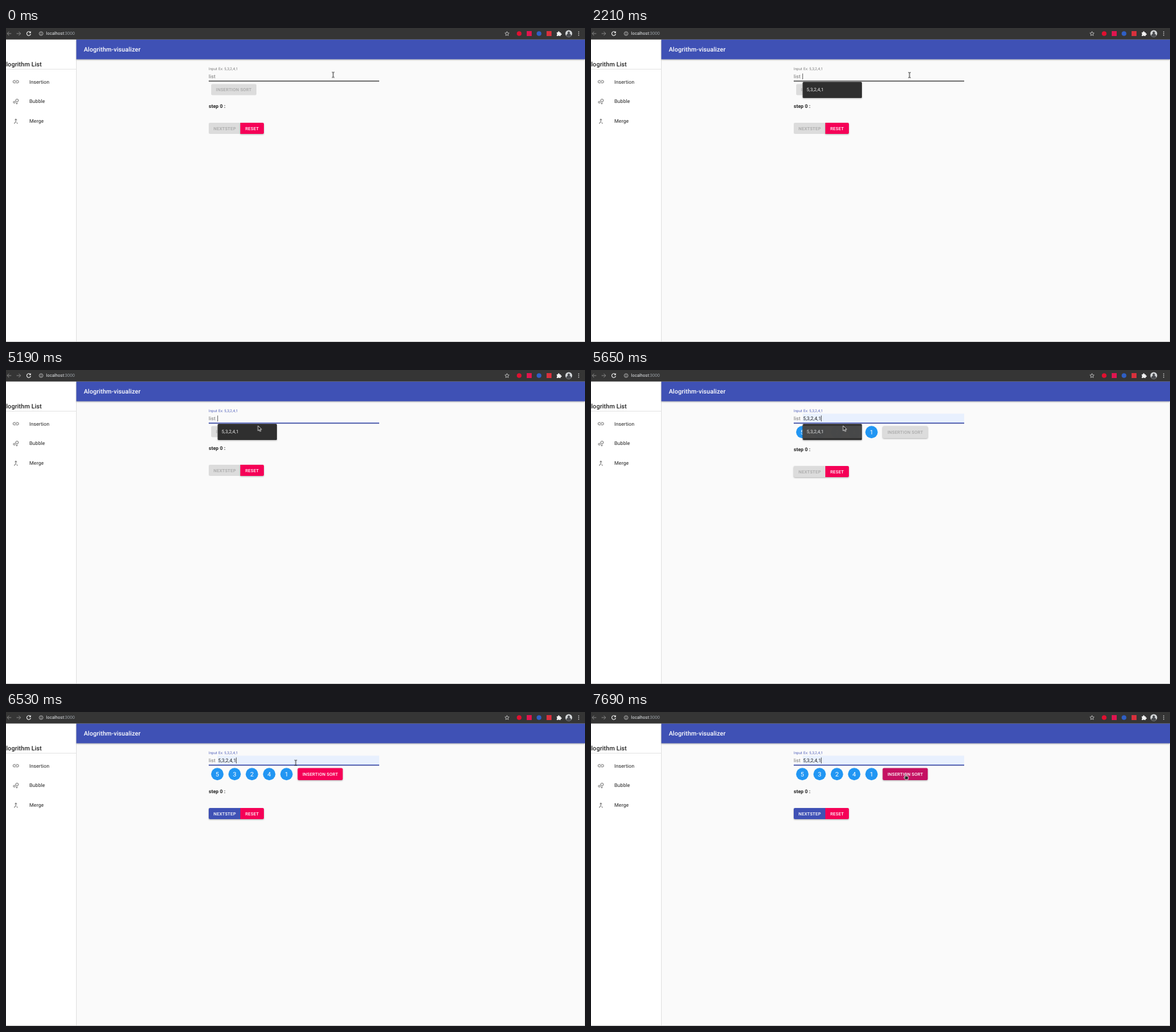
An HTML page that plays this animation: 934 px wide and 507 px high, repeating every 8 s.

```html
<!DOCTYPE html>
<html lang="en">
<head>
<meta charset="utf-8">
<title>Sorting visualizer</title>
<style>
html, body { margin: 0; width: 100%; height: 100%; overflow: hidden; background: #fafafa; }
svg { display: block; width: 934px; height: 507px; }
text { font: 8px Roboto, sans-serif; letter-spacing: .00938em; fill: #212121; text-rendering: geometricPrecision; white-space: pre; }
.title { font-size: 10px; font-weight: 500; letter-spacing: .0075em; }
.btn { font-size: 7px; font-weight: 500; letter-spacing: .02857em; }
.url { font-size: 7px; letter-spacing: 0; fill: #e8eaed; }
.num { font-size: 10px; text-anchor: middle; fill: #fff; letter-spacing: 0; }
.step { font-weight: 700; }
.off { fill: #dcdcdc; }
.offText { fill: #a8a8a8; }
.white { fill: #fff; }
.grey { fill: #757575; }
.lift { filter: drop-shadow(0 1px 1px rgba(0,0,0,.3)); }

/* everything shares one 8 s clock */
.t { animation: 8s linear infinite; }
.hard { animation: 8s step-end infinite; }
.before { animation-name: before; }
.after { animation-name: after; }
.label { animation-name: label; }
.focus { animation-name: focus; transform-origin: 464.5px 85px; }
.blink { animation-name: blink; }
.fill { animation-name: fill; }
.popup { animation-name: popup; transform-origin: 389px 100px; }
.hover { animation-name: hover; }
.next { animation-name: next; }
.sort { animation-name: sort; }
.on { animation-name: on; }
.pointer { animation-name: move; }
.beam { animation-name: beam; }
.arrow { animation-name: arrow; }
.hand { animation-name: hand; }

@keyframes before { 0% { opacity: 1 } 70.625%, 100% { opacity: 0 } }
@keyframes after { 0% { opacity: 0 } 70.625%, 100% { opacity: 1 } }
@keyframes label { 0%, 27.7% { fill: #7d7d7d } 30.2%, 100% { fill: #5766bd } }
@keyframes focus {
  0%, 27.7% { transform: scaleX(0); animation-timing-function: cubic-bezier(0, 0, .2, 1) }
  30.2%, 100% { transform: scaleX(1) }
}
@keyframes blink {
  0% { opacity: 0 } 27.55% { opacity: 1 } 35.25% { opacity: 0 } 42.75% { opacity: 1 }
  50.25% { opacity: 0 } 57.75% { opacity: 1 } 65.25%, 100% { opacity: 0 }
}
@keyframes fill { 0% { opacity: 0 } 65.5%, 100% { opacity: 1 } }
@keyframes hover { 0% { opacity: 0 } 65.5%, 100% { opacity: 1 } }
@keyframes popup {
  0%, 27.54% { opacity: 0; transform: none }
  27.55%, 70.625% { opacity: 1; transform: none }
  73.125%, 100% { opacity: 0; transform: scale(.96, .9) }
}
@keyframes next {
  0%, 70.625% { fill: #dcdcdc; animation-timing-function: cubic-bezier(.4, 0, .2, 1) }
  73.75%, 100% { fill: #3f51b5 }
}
@keyframes sort {
  0%, 70.625% { fill: #dcdcdc; animation-timing-function: cubic-bezier(.4, 0, .2, 1) }
  73.75%, 91.4% { fill: #f50057; animation-timing-function: cubic-bezier(.4, 0, .2, 1) }
  94.5%, 100% { fill: #c51162 }
}
@keyframes on { 0%, 70.625% { fill: #a8a8a8 } 72%, 100% { fill: #fff } }
@keyframes move {
  0%, 5.875% { transform: translate(527.7px, 75.6px) }
  10.25%, 40.25% { transform: translate(513.7px, 76px) }
  46.25%, 48.6% { transform: translate(435px, 93px) }
  49.5%, 57.25% { transform: translate(423.5px, 86px) }
  58.9%, 63.875% { transform: translate(415px, 85.5px) }
  64.875%, 70.625% { transform: translate(406.5px, 90px) }
  72.3%, 79.875% { transform: translate(416.3px, 85.5px) }
  81.6% { transform: translate(467.2px, 82px) }
  89.5%, 90.4% { transform: translate(500px, 88px) }
  96.1%, 100% { transform: translate(508px, 104.5px) }
}
@keyframes beam { 0% { opacity: 1 } 44.5% { opacity: 0 } 71.2% { opacity: 1 } 91.4%, 100% { opacity: 0 } }
@keyframes arrow { 0% { opacity: 0 } 44.5% { opacity: 1 } 71.2%, 100% { opacity: 0 } }
@keyframes hand { 0% { opacity: 0 } 91.4%, 100% { opacity: 1 } }
</style>
</head>
<body>
<svg viewBox="0 0 934 507">
  <!-- page -->
  <rect width="934" height="507" fill="#fafafa"/>
  <rect y="18" width="113" height="489" fill="#fff"/>
  <rect x="113" y="18" width="1" height="489" fill="#e0e0e0"/>
  <rect y="66" width="113" height="1" fill="#e4e4e4"/>
  <rect class="lift" x="113.5" y="18.5" width="820.5" height="32" fill="#3f51b5"/>
  <rect x="933" y="51" width="1" height="456" fill="#e6e6e6"/>
  <rect y="506" width="934" height="1" fill="#c4c4c4"/>
  <text class="title white" x="125.4" y="38">Alogrithm-visualizer</text>
  <text class="title" x="-6.5" y="62">Alogrithm List</text>

  <!-- browser bar -->
  <rect width="934" height="18.6" fill="#353535"/>
  <g fill="none" stroke="#858585" stroke-width="1">
    <path d="M8.5 9H2M5 5.8 1.8 9 5 12.2"/>
    <path d="M17 9h6.5M20.5 5.8 23.7 9l-3.2 3.2"/>
    <path d="M39.2 6.9A3.2 3.2 0 1 0 39.9 9.6" stroke="#f1f1f1" stroke-width="1.1"/>
    <path d="M40.2 5v3.2H37z" fill="#f1f1f1" stroke="none"/>
    <circle cx="56.6" cy="9" r="3" stroke="#d0d0d0" stroke-width=".8"/>
    <path d="M56.6 8.5v2.2M56.6 7v.8" stroke="#d0d0d0" stroke-width=".8"/>
    <path d="M808.2 5.7l1 2.2 2.4.3-1.8 1.6.5 2.4-2.1-1.2-2.1 1.2.5-2.4-1.8-1.6 2.4-.3z" stroke="#d0d0d0" stroke-width=".8"/>
  </g>
  <text class="url" x="64.8" y="11.4">localhost<tspan fill="#9aa0a6">:3000</tspan></text>
  <circle cx="827.8" cy="9" r="3.8" fill="#e01030"/>
  <rect x="840" y="5" width="8" height="8" fill="#e0154f"/>
  <circle cx="859.8" cy="9" r="3.8" fill="#2f5fc4"/>
  <rect x="872" y="5" width="8" height="8" fill="#d8303c"/>
  <path d="M888.5 7h2a1.2 1.2 0 1 1 2.2 0h2v2a1.2 1.2 0 1 1 0 2.1v1.9h-2a1.2 1.2 0 0 0-2.2 0h-2v-2a1.2 1.2 0 0 0 0-2.1z" fill="#f1f1f1"/>
  <circle cx="907.8" cy="9" r="5.5" fill="#d5d8da"/>
  <path d="M903.8 12.8q.4-3.3 2.7-3.7a2 2 0 1 1 2.6 0q2.3.4 2.7 3.7a5.5 5.5 0 0 1-8 0z" fill="#4a4c50"/>
  <g fill="#e8e8e8"><circle cx="923.8" cy="6.2" r=".8"/><circle cx="923.8" cy="9" r=".8"/><circle cx="923.8" cy="11.8" r=".8"/></g>

  <!-- menu -->
  <g class="grey">
    <path transform="translate(9.9 80.8) scale(.5)" d="M3.9 12c0-1.71 1.39-3.1 3.1-3.1h4V7H7c-2.76 0-5 2.24-5 5s2.24 5 5 5h4v-1.9H7c-1.71 0-3.1-1.39-3.1-3.1zM8 13h8v-2H8zm9-6h-4v1.9h4c1.71 0 3.1 1.39 3.1 3.1s-1.39 3.1-3.1 3.1h-4V17h4c2.76 0 5-2.24 5-5s-2.24-5-5-5z"/>
    <path transform="translate(9.9 144.5) scale(.5)" d="M17 20.41 18.41 19 15 15.59 13.59 17zM7.5 8H11v5.59L5.59 19 7 20.41l6-6V8h3.5L12 3.5z"/>
  </g>
  <g fill="none" stroke="#666" stroke-width="1">
    <circle cx="17.8" cy="117" r="2.2"/><circle cx="13.4" cy="119.8" r="1.5"/><circle cx="17.4" cy="121.7" r=".9"/>
  </g>
  <text x="37.8" y="89.6">Insertion</text>
  <text x="37.8" y="121.3">Bubble</text>
  <text x="37.8" y="153.1">Merge</text>

  <!-- input -->
  <text class="label t" x="327" y="68.2" style="font-size:6px">Input Ex: 5,3,2,4,1</text>
  <rect class="fill hard" x="341.5" y="70.5" width="260.5" height="14.5" fill="#e8f0fe"/>
  <text class="grey" x="327" y="81">list</text>
  <text class="fill hard" x="341.9" y="81">5,3,2,4,1</text>
  <rect x="327" y="85" width="275" height="1.3" fill="#333"/>
  <rect class="focus t" x="327" y="84.9" width="275" height="1.5" fill="#3f51b5"/>
  <rect class="blink hard" x="341.2" y="73.5" width=".8" height="9.5" fill="#444"/>
  <rect class="after hard" x="371.2" y="73.5" width=".8" height="9.5" fill="#333"/>

  <!-- empty list -->
  <g class="before hard">
    <rect class="off" x="331" y="90.5" width="73" height="18" rx="2"/>
    <text class="btn offText" x="338.8" y="102">INSERTION SORT</text>
    <text class="step" x="327" y="128.8">step 0 :</text>
    <path class="off" d="M329 153h49v18h-49a2 2 0 0 1-2-2v-14a2 2 0 0 1 2-2z"/>
    <path class="lift" d="M378 153h36a2 2 0 0 1 2 2v14a2 2 0 0 1-2 2h-36z" fill="#f50057"/>
    <text class="btn offText" x="334.8" y="164.5">NEXTSTEP</text>
    <text class="btn white" x="386" y="164.5">RESET</text>
  </g>

  <!-- filled list -->
  <g class="after hard">
    <g fill="#2196f3">
      <circle cx="340.9" cy="100.3" r="10"/><circle cx="368.8" cy="100.3" r="10"/><circle cx="396.7" cy="100.3" r="10"/><circle cx="424.6" cy="100.3" r="10"/><circle cx="452.5" cy="100.3" r="10"/>
    </g>
    <text class="num" x="340.9" y="103.9">5</text>
    <text class="num" x="368.8" y="103.9">3</text>
    <text class="num" x="396.7" y="103.9">2</text>
    <text class="num" x="424.6" y="103.9">4</text>
    <text class="num" x="452.5" y="103.9">1</text>
    <g class="lift"><rect class="sort t" x="470.5" y="90.5" width="72.7" height="19.5" rx="2"/></g>
    <text class="btn on t" x="478.2" y="102.8">INSERTION SORT</text>
    <text class="step" x="327" y="130.8">step 0 :</text>
    <g class="lift">
      <path class="next t" d="M329 155h49v18h-49a2 2 0 0 1-2-2v-14a2 2 0 0 1 2-2z"/>
      <path d="M378 155h36a2 2 0 0 1 2 2v14a2 2 0 0 1-2 2h-36z" fill="#f50057"/>
    </g>
    <text class="btn on t" x="334.8" y="166.5">NEXTSTEP</text>
    <text class="btn white" x="386" y="166.5">RESET</text>
  </g>

  <!-- suggestion -->
  <g class="popup t">
    <rect class="lift" x="341.5" y="87" width="95.5" height="26" rx="1.5" fill="#2f2f2f"/>
    <rect class="hover hard" x="341.5" y="90" width="95.5" height="20" fill="#484848"/>
    <text x="347.8" y="102.4" style="font-size:7.5px;fill:#eee">5,3,2,4,1</text>
  </g>

  <!-- pointer -->
  <g class="pointer t">
    <path class="beam hard" d="M-2-4.3Q0-4.3 0-3.3 0-4.3 2-4.3M0-3.3V3.3M-2 4.3Q0 4.3 0 3.3 0 4.3 2 4.3" fill="none" stroke="#222" stroke-width="1"/>
    <path class="arrow hard" d="M0 0v8.2l1.9-1.7 1.3 2.8 1.4-.7-1.3-2.7h2.5z" fill="#1c1c1c" stroke="#fff" stroke-width=".8"/>
    <path class="hand hard" d="M-1.4-4q.9-.8 1.5 0v3l3 .6q1 .3.9 1.3l-.6 3.6h-4.4l-2.4-3.2q0-1 1-.7l1 .7z" fill="#222" stroke="#fff" stroke-width=".8"/>
  </g>
</svg>
</body>
</html>
```
